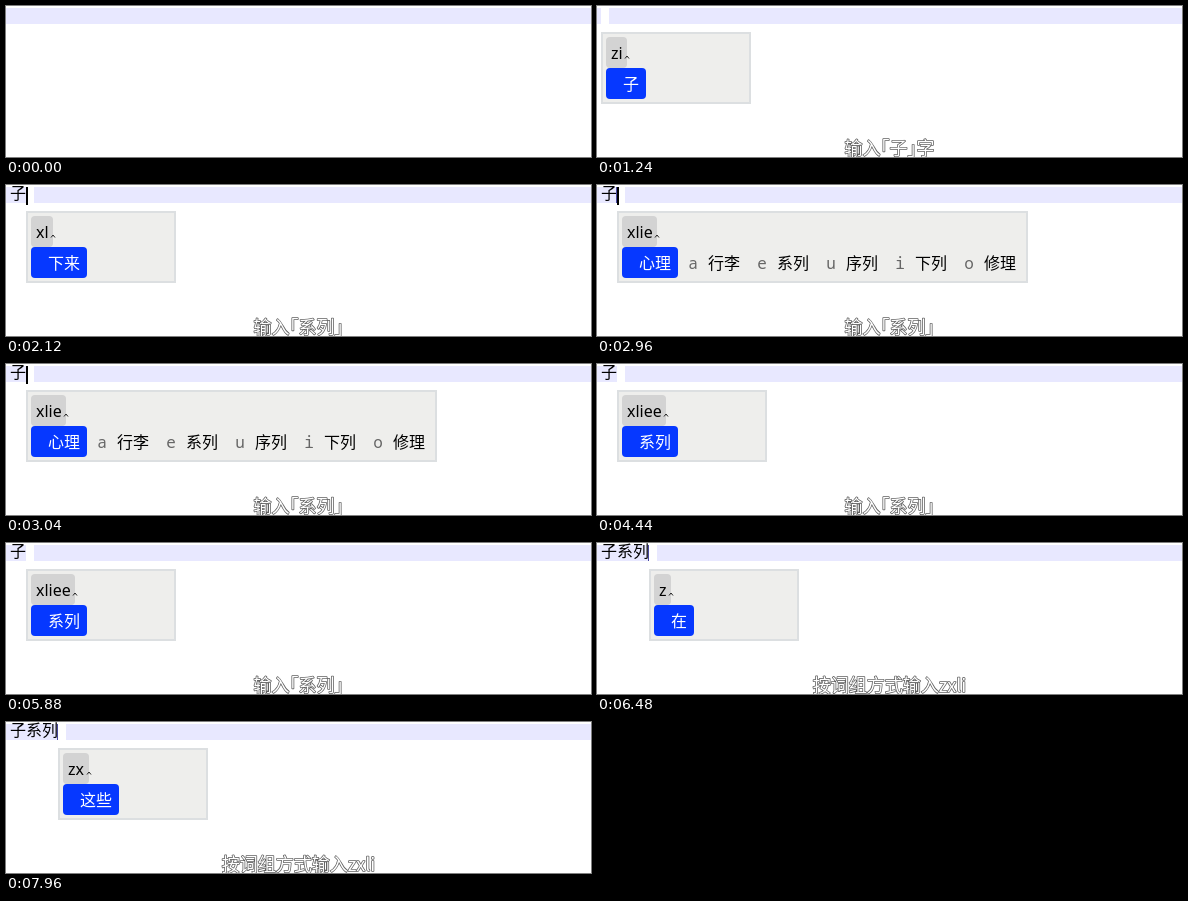
Animation, 585 px wide and 151 px high, one loop 8000 ms. Source, as an HTML page:

```html
<!DOCTYPE html>
<html lang="zh-CN">
<head>
<meta charset="utf-8">
<style>
  html, body { margin: 0; width: 100%; height: 100%; overflow: hidden; background: #fff; }
  svg { display: block; font: 16px "Noto Sans CJK SC", "Noto Sans CJK", sans-serif; }
  text { white-space: pre; }
  .latin { font-family: "Noto Sans", "Open Sans", sans-serif; }
  .label { font-family: "Noto Sans Mono", "DejaVu Sans Mono", monospace; fill: #666; text-anchor: middle; }
  .caption { font-size: 18px; font-weight: 500; text-anchor: middle; fill: #fff; stroke: #606060; stroke-width: 1.5; stroke-linejoin: round; paint-order: stroke; }
</style>
</head>
<body>
<svg id="stage" width="585" height="151" viewBox="0 0 585 151">
  <rect y="2" width="585" height="16" fill="#e8e8ff"/>
  <rect id="gap" y="2" width="8" height="16" fill="#fff"/>
  <text id="committed" x="4" y="14" font-weight="300"></text>
  <rect id="editorCaret" y="2" width="1" height="16" fill="#4848a0"/>
  <rect id="inputCaret" y="2" width="2" height="18"/>
  <g id="popup">
    <rect id="panel" x="1" y="27" height="70" fill="#eeeeec" stroke="#dcdfe1" stroke-width="2"/>
    <rect id="codePill" x="5" y="31" height="31" rx="4" fill="#d3d3d3"/>
    <text id="code" class="latin" x="10" y="53"></text>
    <path id="mark" d="M-2 52.5L0 50L2 52.5" fill="none" stroke="#222"/>
    <rect id="choicePill" x="5" y="62" height="31" rx="4" fill="#0638ff"/>
    <text id="choice" x="22" y="84" fill="#fff" font-weight="350"></text>
    <g id="others"></g>
  </g>
  <text id="caption" class="caption" x="292.5" y="148.5"></text>
</svg>
<script>
const LOOP = 8000;
const LABELS = "aeuio";
const el = Object.fromEntries([...document.querySelectorAll("[id]")].map(n => [n.id, n]));

const SINGLE = "输入｢子｣字", WORD = "输入｢系列｣", PHRASE = "按词组方式输入zxli";
const LIST = ["心理", "行李", "系列", "序列", "下列", "修理"];

// Each state holds until the next one starts.
const states = [
  { at: 0, done: "", code: "", choices: [""], caption: "" },
  { at: 200, done: "", code: "z", choices: ["在"], caption: SINGLE },
  { at: 680, done: "", code: "zi", choices: ["在"], caption: SINGLE },
  { at: 720, done: "", code: "zi", choices: ["子"], caption: SINGLE },
  { at: 1720, done: "子", code: "x", choices: ["下"], caption: WORD },
  { at: 2080, done: "子", code: "xl", choices: ["下"], caption: WORD },
  { at: 2120, done: "子", code: "xl", choices: ["下来"], caption: WORD },
  { at: 2680, done: "子", code: "xli", choices: LIST.slice(0, 5), width: 349, caption: WORD },
  { at: 2840, done: "子", code: "xlie", choices: LIST, width: 411, caption: WORD },
  { at: 4440, done: "子", code: "xliee", choices: ["系列"], caption: WORD },
  { at: 6480, done: "子系列", code: "z", choices: ["在"], caption: PHRASE },
  { at: 7080, done: "子系列", code: "zx", choices: ["在"], caption: PHRASE },
  { at: 7120, done: "子系列", code: "zx", choices: ["这些"], caption: PHRASE }
];

// Alternating on and off times of the two carets.
const editorBlink = [1840, 2080, 2320, 2560, 2840, 3040, 3280, 3480, 3720, 3960, 4160, 4440,
  4680, 4920, 5160, 5440, 5680, 5880, 6160, 6440, 6480, 6760, 7000, 7200, 7480, 7720, 7960];
const inputBlink = [720, 1240, 2120, 2640, 2680, 3360, 3880, 4440, 7120, 7640];

const isOn = (toggles, t) => toggles.filter(at => at <= t).length % 2 === 1;
const show = (node, visible) => node.setAttribute("visibility", visible ? "visible" : "hidden");
const set = (node, name, value) => node.setAttribute(name, value);

function addText(content, x, className) {
  const node = document.createElementNS("http://www.w3.org/2000/svg", "text");
  set(node, "x", x);
  set(node, "y", 84);
  set(node, "class", className);
  node.textContent = content;
  el.others.append(node);
}

function applyState({ done, code, choices, caption, width = 150 }) {
  const base = 4 + done.length * 16;
  el.committed.textContent = done;
  el.caption.textContent = caption;
  set(el.gap, "x", base);
  set(el.inputCaret, "x", base);
  set(el.editorCaret, "x", base - 1);
  show(el.gap, code);
  show(el.popup, code);

  set(el.popup, "transform", `translate(${base} 0)`);
  set(el.panel, "width", width - 2);
  el.code.textContent = code;
  const pillWidth = Math.round(el.code.getComputedTextLength() - 0.4) + 10;
  set(el.codePill, "width", pillWidth);
  set(el.mark, "transform", `translate(${pillWidth + 5} 0)`);
  el.choice.textContent = choices[0];
  set(el.choicePill, "width", 24 + choices[0].length * 16);

  el.others.replaceChildren();
  choices.slice(1).forEach((word, i) => {
    addText(LABELS[i], 76 + i * 69, "label");
    addText(word, 91 + i * 69, "");
  });
}

let current;
function render(t) {
  const state = states.findLast(s => s.at <= t);
  if (state !== current) applyState(current = state);
  show(el.editorCaret, isOn(editorBlink, t));
  show(el.inputCaret, isOn(inputBlink, t));
}

const start = performance.now();
function tick() {
  render((performance.now() - start) % LOOP);
  requestAnimationFrame(tick);
}
tick();
</script>
</body>
</html>
```
